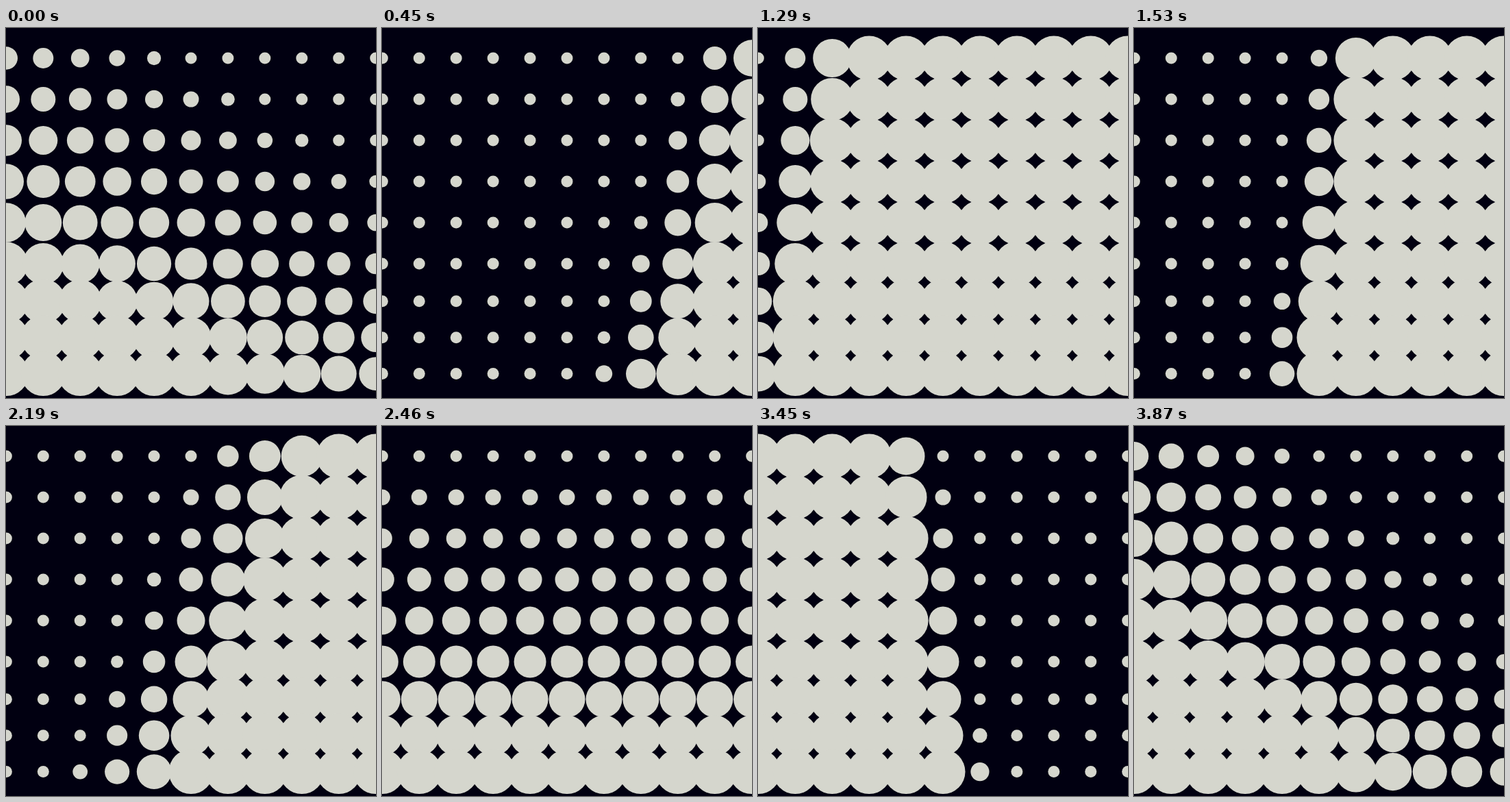
Write an HTML page with a canvas that moves like this. It is 540 px wide and 540 px high and loops after 3.9 s.

```html
<!DOCTYPE html>
<html lang="en">
<head>
<meta charset="utf-8">
<title>Halftone tilt</title>
<style>
  html, body { margin: 0; width: 100%; height: 100%; overflow: hidden; background: #010011; }
  canvas { display: block; width: 540px; height: 540px; }
</style>
</head>
<body>
<canvas id="stage" width="540" height="540"></canvas>
<script>
const LOOP = 3900, STEP = 30;
const COLS = 11, ROWS = 9, COL_GAP = 53.92;
const MIN_R = 8.5, MAX_R = 32.5, MID_R = (MIN_R + MAX_R) / 2;
const ROW_GAIN = (MAX_R - MIN_R) / (ROWS - 1);
const MAX_TILT = 81 * Math.PI / 180;
const SWEEP = 1580; // the edge travels sideways during this first part of the loop

const clamp = (v, lo, hi) => Math.min(hi, Math.max(lo, v));
const easeInOutQuart = u => u < 0.5 ? 8 * u ** 4 : 1 - 8 * (1 - u) ** 4;
const progress = (t, start, duration) => easeInOutQuart(clamp((t - start) / duration, 0, 1));

// Angle of the edge: flips to the left, then back across the end of the loop
function tilt(t) {
  const time = t < SWEEP ? t + LOOP : t;
  return MAX_TILT * (1 - 2 * progress(time, 1710, 1500) + 2 * progress(time, 3384, 1150));
}

// The lower rows stand a little closer together
const rowY = row => row < 6 ? 44 + 60 * row : 398.8 + 52.9 * (row - 6);

const ctx = document.getElementById("stage").getContext("2d");

function draw(t) {
  const swing = t < SWEEP ? Math.sin(Math.PI * t / SWEEP) : 0;
  const center = 5 + swing ** 2 * (662 - t) * 0.0241;
  const colGain = ROW_GAIN * Math.tan(tilt(t)) * (1 - 0.57 * swing);

  ctx.fillStyle = "#010011";
  ctx.fillRect(0, 0, 540, 540);
  ctx.fillStyle = "#d5d6cd";
  for (let row = 0; row < ROWS; row++) {
    for (let col = 0; col < COLS; col++) {
      const size = MID_R + ROW_GAIN * (row - 4) + colGain * (col - center);
      ctx.beginPath();
      ctx.arc(0.4 + col * COL_GAP, rowY(row), clamp(size, MIN_R, MAX_R), 0, 2 * Math.PI);
      ctx.fill();
    }
  }
}

const start = performance.now();
function tick() {
  const t = (performance.now() - start) % LOOP;
  draw(Math.floor(t / STEP) * STEP);
  requestAnimationFrame(tick);
}
tick();
</script>
</body>
</html>
```
